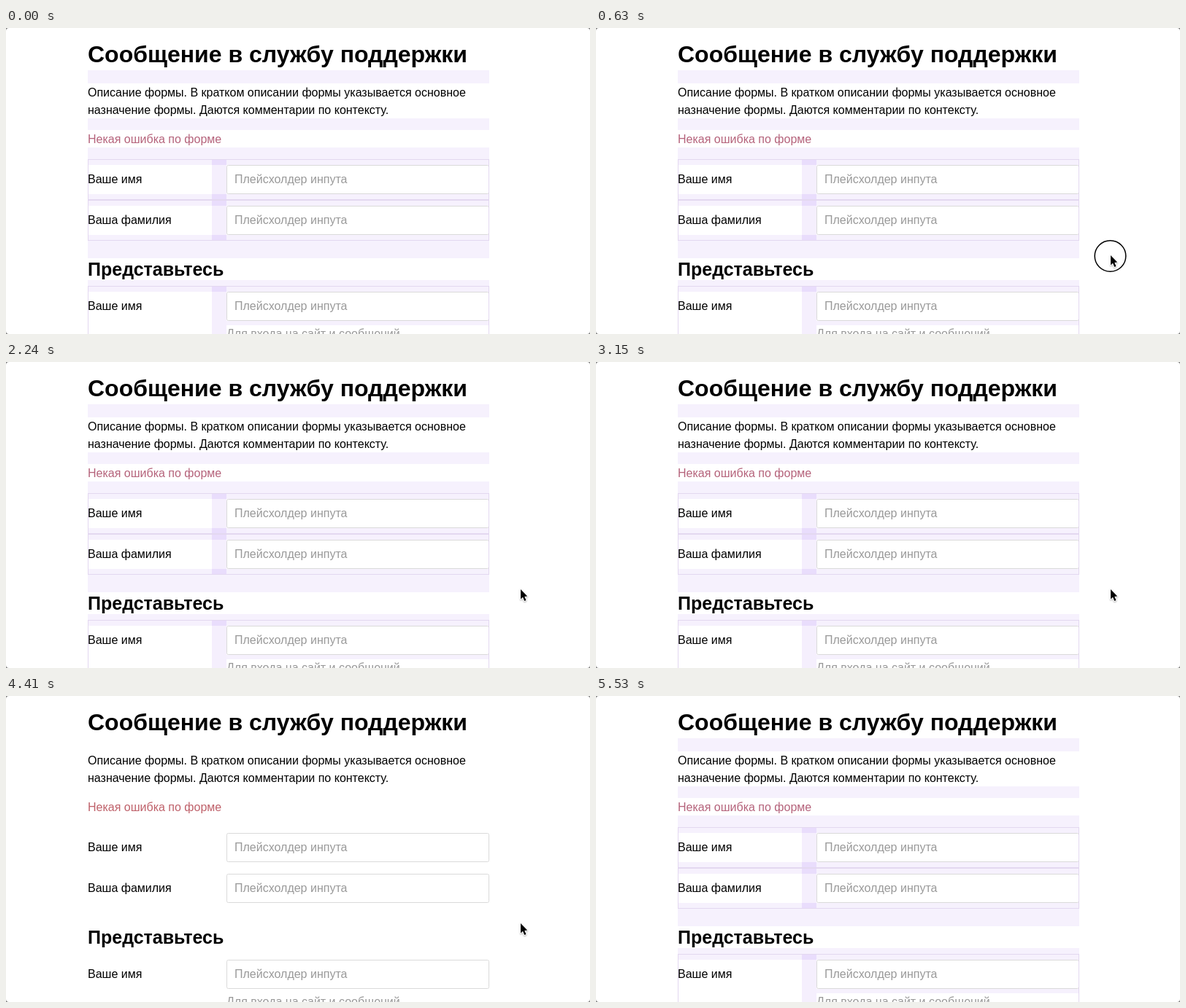
These frames come from a looping animation (800x420 px, 5.67 s). An HTML page with a canvas:

```html
<!DOCTYPE html>
<html lang="ru">
<head>
<meta charset="utf-8">
<title>Форма</title>
<style>
  html, body { margin: 0; width: 100%; height: 100%; overflow: hidden; background: #fff; }
  canvas { display: block; }
</style>
</head>
<body>
<canvas id="stage" width="800" height="420"></canvas>
<script>
const ctx = document.getElementById('stage').getContext('2d');
const LOOP = 5670, STEP = 70;
const LEFT = 112, RIGHT = 662, GUTTER = 282, FIELD = 302;
const ROWS = [180, 236, 354];
const BANDS = [[58, 76], [124, 140], [164, 180], [292, 316], [346, 354]];
const FONT = '"Liberation Sans", Arial, sans-serif';

// Spacing overlay colours: settled and while the form is outlined
const CALM = { band: '#f6f1fd', gutter: '#f5effd', cross: '#e9ddfc', line: '#e3d8f0' };
const HOVER = { band: '#f9f2fd', gutter: '#f0e6fe', cross: '#ebdffd', line: '#e3d8ee' };

function box(x1, y1, x2, y2, color) {
  ctx.fillStyle = color;
  ctx.fillRect(x1, y1, x2 - x1, y2 - y1);
}

function text(str, x, y, color = '#000', size = 16, weight = 'normal') {
  ctx.font = `${weight} ${size}px ${FONT}`;
  ctx.fillStyle = color;
  ctx.fillText(str, x, y);
}

function drawBands(tone) {
  for (const [top, bottom] of BANDS) box(LEFT, top, RIGHT, bottom, tone.band);
}

function drawRow(y, tone, framed) {
  const last = y === ROWS[2];
  const bottom = last ? 440 : y + 56;
  box(LEFT, y, RIGHT, y + 8, tone.band);
  box(FIELD, y + 48, RIGHT, y + (last ? 54 : 56), tone.band);
  if (!last) box(LEFT, y + 48, GUTTER, bottom, tone.band);
  box(GUTTER, y, FIELD, bottom, tone.gutter);
  box(GUTTER, y, FIELD, y + 8, tone.cross);
  if (!last) box(GUTTER, y + 48, FIELD, bottom, tone.cross);
  box(LEFT, y, RIGHT, y + 1, tone.line);
  if (!last) box(LEFT, bottom - 1, RIGHT, bottom, tone.line);
  if (framed) {
    box(LEFT, y, LEFT + 1, bottom, tone.line);
    box(RIGHT - 1, y, RIGHT, bottom, tone.line);
  }
}

function drawInput(y) {
  ctx.beginPath();
  ctx.roundRect(FIELD + 0.5, y + 8.5, RIGHT - FIELD - 1, 39, 2);
  ctx.fillStyle = '#fff';
  ctx.fill();
  ctx.strokeStyle = '#dadada';
  ctx.lineWidth = 1;
  ctx.stroke();
  text('Плейсхолдер инпута', 313, y + 33, '#999');
}

function drawForm(tinted) {
  text('Сообщение в службу поддержки', LEFT, 47, '#000', 32, 'bold');
  text('Описание формы. В кратком описании формы указывается основное', LEFT, 94);
  text('назначение формы. Даются комментарии по контексту.', LEFT, 118);
  text('Некая ошибка по форме', LEFT, 158, tinted ? '#b5637b' : '#bf616a');
  text('Представьтесь', LEFT, 340, '#000', 25, 'bold');
  const labels = ['Ваше имя', 'Ваша фамилия', 'Ваше имя'];
  ROWS.forEach((y, i) => {
    drawInput(y);
    text(labels[i], LEFT, y + 33);
  });
  text('Для входа на сайт и сообщений', FIELD, 425, '#999');
}

function drawOutline() {
  ctx.strokeStyle = '#438fa3';
  ctx.lineWidth = 2;
  ctx.strokeRect(112, 12, 550, 440);
}

function drawCursor() {
  const arrow = [[0, 0], [0, 13.5], [3, 10.8], [5.2, 16], [7.5, 15], [5.3, 10], [9.2, 9.6]];
  ctx.save();
  ctx.translate(705, 312);
  ctx.beginPath();
  for (const [x, y] of arrow) ctx.lineTo(x, y);
  ctx.closePath();
  ctx.lineJoin = 'round';
  ctx.lineWidth = 2;
  ctx.strokeStyle = '#fff';
  ctx.shadowColor = 'rgba(0,0,0,0.3)';
  ctx.shadowBlur = 2;
  ctx.shadowOffsetY = 1;
  ctx.stroke();
  ctx.shadowColor = 'transparent';
  ctx.fillStyle = '#000';
  ctx.fill();
  ctx.restore();
}

function drawRing(alpha) {
  ctx.globalAlpha = alpha;
  ctx.beginPath();
  ctx.arc(704.5, 313, 21.3, 0, Math.PI * 2);
  ctx.strokeStyle = '#000';
  ctx.lineWidth = 1.5;
  ctx.stroke();
  ctx.globalAlpha = 1;
}

function drawCorners() {
  ctx.beginPath();
  ctx.rect(0, 0, 800, 420);
  ctx.roundRect(0, 0, 800, 420, 4);
  ctx.fillStyle = '#777';
  ctx.fill('evenodd');
}

function render(time) {
  const t = Math.floor((time % LOOP) / STEP) * STEP;
  const within = (from, to) => t >= from && t < to;
  const outlined = within(70, 420) || within(4830, 5250);
  const tone = outlined ? HOVER : CALM;
  const bands = !within(3570, 4830);
  const rows = !within(3570, 4690);

  box(0, 0, 800, 420, '#fff');
  if (bands) drawBands(tone);
  if (rows) for (const y of ROWS) drawRow(y, tone, !outlined);
  drawForm(bands && !outlined);
  if (bands && !outlined) {
    for (const y of ROWS) box(RIGHT - 1, y, RIGHT, y + 56, tone.line);
  }
  if (outlined) drawOutline();
  if (within(490, 770)) drawRing(within(560, 700) ? 1 : 0.5);
  if (within(420, 4830)) drawCursor();
  drawCorners();
}

const start = performance.now();
function tick() {
  render(performance.now() - start);
  requestAnimationFrame(tick);
}
tick();
</script>
</body>
</html>
```
